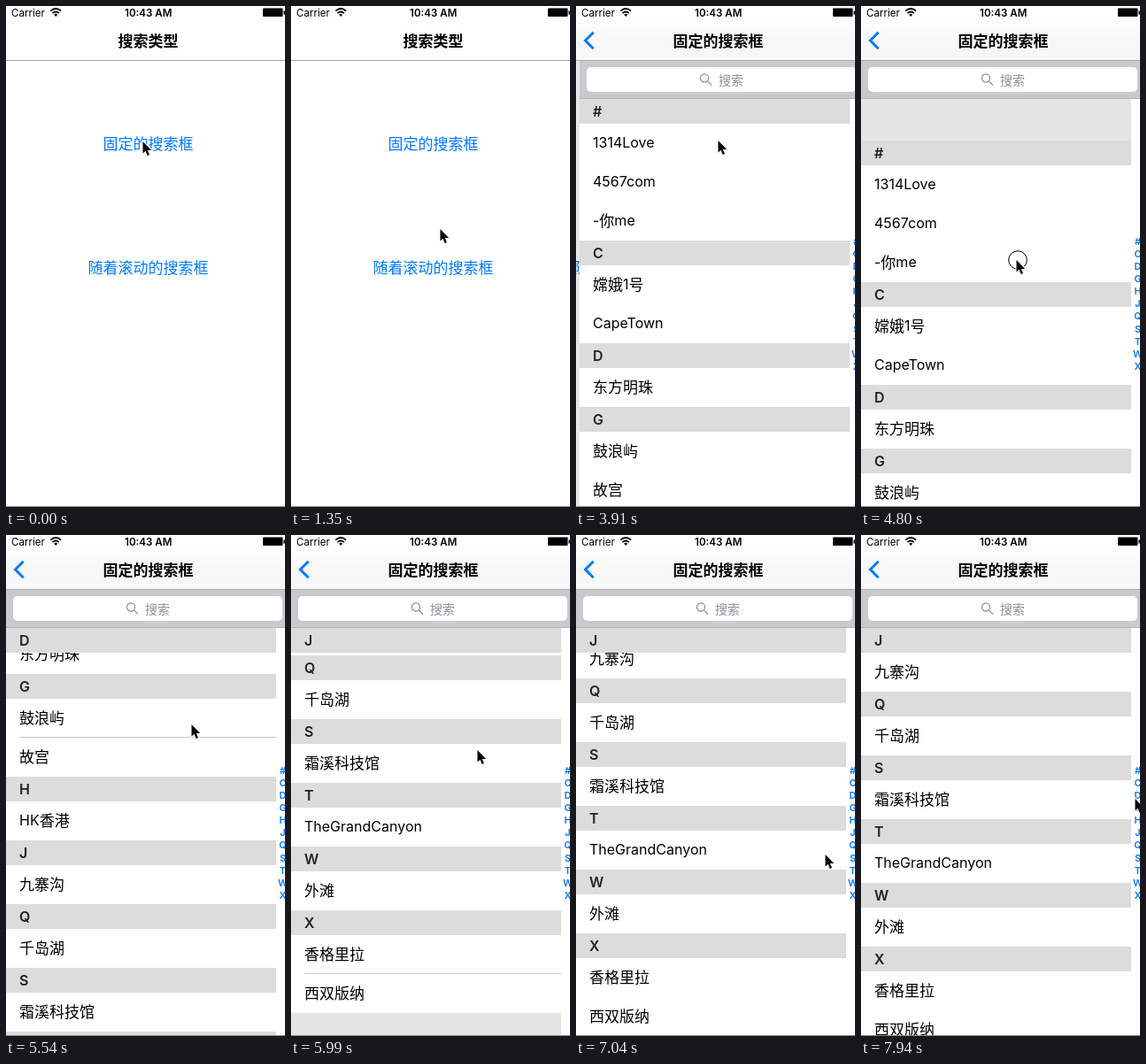
An HTML page that plays this animation: 315x566 px, repeating every 8 s.

```html
<!DOCTYPE html>
<html lang="zh-CN">
<head>
<meta charset="utf-8">
<style>
html, body { margin: 0; width: 100%; height: 100%; overflow: hidden; background: #fff; }
#stage { position: absolute; left: 0; top: 0; width: 315px; height: 566px; overflow: hidden; background: #fff;
  font: 16px/1 Inter, "Noto Sans CJK SC", "Noto Sans CJK", sans-serif; color: #000; white-space: nowrap; }
#stage * { box-sizing: border-box; }
#stage div, #stage svg { position: absolute; }
.cjk { position: relative; top: -1px; font: 17px/1 "Noto Sans CJK SC", "Noto Sans CJK", sans-serif; font-weight: inherit; }
.page { left: 0; top: 62px; width: 320px; height: 504px; overflow: hidden; background: #fff; }
.center { left: 0; width: 321px; height: 24px; display: flex; align-items: center; justify-content: center; }
.link { color: #007aff; }
#shade { inset: 0; background: #000; }
#nav { left: 0; top: 0; width: 315px; height: 62px; background: #fefefe; border-bottom: 1px solid #a9a9ac; }
#tint { inset: 0; background: linear-gradient(#fff 8px, #f7f7f8 40px); }
.title { top: 27px; font-weight: 600; }
.status { top: 1px; font-size: 11.6px; line-height: 14px; }
#bar { left: 0; top: 0; width: 320px; height: 43px; background: #c9c9ce; border-bottom: 1px solid #b3b3b7; }
#field { left: 8px; top: 7px; width: 304px; height: 28px; border-radius: 5px; background: #fff; }
#hint { left: 157px; top: 14px; color: #8e8e93; }
#hint .cjk { font-size: 14px; }
#list { left: 0; top: 43px; width: 305px; height: 461px; overflow: hidden; background: #e5e5e5; }
#content { left: 0; top: 0; width: 305px; background: #fff; }
.row, .head { left: 0; width: 305px; padding-left: 15px; display: flex; align-items: center; }
.row { height: 44px; padding-bottom: 2px; }
.head { height: 28px; background: #dcdcdc; color: #222; font-weight: 600; z-index: 1; }
.rule { left: 15px; right: 0; height: 1px; background: #c8c7cc; }
.letter { width: 20px; left: 302.5px; text-align: center; color: #007aff; font-size: 11px; font-weight: 600; line-height: 14px; }
#foot { left: 0; top: 565px; width: 315px; height: 1px; background: #8a8a8a; }
</style>
</head>
<body>
<div id="stage">
  <div class="page" id="home">
    <div class="center link" id="fixedLink" style="top:81px">固定的搜索框</div>
    <div class="center link" style="top:221px">随着滚动的搜索框</div>
    <div id="shade"></div>
  </div>
  <div class="page" id="places">
    <div id="bar">
      <div id="field"></div>
      <svg style="left:135px;top:13px" width="16" height="16" fill="none" stroke="#8e8e93" stroke-width="1.2">
        <circle cx="6" cy="6.5" r="4.6"/><path d="M9.4 9.9L14 14.5"/>
      </svg>
      <div id="hint">搜索</div>
    </div>
    <div id="list"><div id="content"></div></div>
  </div>
  <div id="nav">
    <div id="tint"></div>
    <div class="center title" id="homeTitle">搜索类型</div>
    <div class="center title" id="listTitle">固定的搜索框</div>
    <svg id="back" style="left:7px;top:27px" width="16" height="24" fill="none" stroke="#007aff" stroke-width="3">
      <path d="M12.7 2.8L3.5 12L12.7 21.2"/>
    </svg>
    <div class="status" style="left:6px">Carrier</div>
    <div class="status" style="left:134px;font-weight:600">10:43 AM</div>
    <svg style="left:49px;top:1px" width="15" height="12" fill="none" stroke="#000" stroke-width="1.8">
      <path d="M1.3 4.6Q7.2 -.6 13.1 4.6M3.5 7.1Q7.2 3.8 10.9 7.1"/>
      <path d="M5.2 8.7Q7.2 7 9.2 8.7L7.2 11Z" fill="#000" stroke="none"/>
    </svg>
    <svg style="left:289px;top:1px" width="26" height="13">
      <rect x="1" y="1.5" width="22.5" height="9.5" rx="1"/><rect x="24.5" y="4.5" width="1.5" height="4"/>
    </svg>
  </div>
  <div id="foot"></div>
  <svg id="cursor" style="left:0;top:0" width="40" height="40">
    <circle id="ring" cx="22" cy="20" r="10.3" fill="none" stroke="#000"/>
    <path d="M20.5 20V33.6L23.5 30.8L25.7 36L28 35L25.8 30H30.2Z" stroke="#fff" stroke-width="2" paint-order="stroke"/>
  </svg>
</div>
<script>
const LOOP = 8000, STEP = 150, WIDTH = 320, HEAD = 28, ROW = 44;
const $ = id => document.getElementById(id);
const wrapCjk = s => s.replace(/[\u4e00-\u9fff]+/g, '<span class="cjk">$&</span>');

const sections = [
  ['#', '1314Love', '4567com', '-你me'], ['C', '嫦娥1号', 'CapeTown'], ['D', '东方明珠'],
  ['G', '鼓浪屿', '故宫'], ['H', 'HK香港'], ['J', '九寨沟'], ['Q', '千岛湖'],
  ['S', '霜溪科技馆'], ['T', 'TheGrandCanyon'], ['W', '外滩'], ['X', '香格里拉', '西双版纳']
];

function add(parent, cls, top, text = '') {
  const el = document.createElement('div');
  el.className = cls;
  el.style.top = top + 'px';
  el.innerHTML = wrapCjk(text);
  parent.append(el);
  return el;
}

for (const el of document.querySelectorAll('.center, #hint')) el.innerHTML = wrapCjk(el.textContent);

let y = 0;
const heads = [], rules = [];
sections.forEach(([letter, ...names], i) => {
  const top = y;
  y += HEAD;
  names.forEach((name, k) => {
    if (k) rules.push(add($('content'), 'rule', y - 1));
    add($('content'), 'row', y, name);
    y += ROW;
  });
  heads.push({ el: add($('content'), 'head', top, letter), letter, top, end: y });
  add($('places'), 'letter', 196.5 + 14.15 * i, letter);
});
$('content').style.height = y + 'px';

const BOTTOM = y - 461;
const JUMP = heads.find(head => head.letter === 'J').top;
const PUSH = 3450, PULL = 4500, FLING = 5550, PICK = 7800;

// Pointer stops: time, x, y
const stops = [[600, 154, 153], [1650, 173, 292], [2550, 160, 152], [4200, 160, 152], [4800, 175, 287],
  [5400, 209, 505], [FLING, 209, 214], [6300, 210, 262], [7350, 309, 400], [7500, 309, 400], [7950, 309, 298]];

function pointerAt(t) {
  const i = stops.findIndex(stop => stop[0] > t);
  if (i <= 0) return stops.at(i).slice(1);
  const [t0, x0, y0] = stops[i - 1], [t1, x1, y1] = stops[i];
  const f = (t - t0) / (t1 - t0);
  return [x0 + (x1 - x0) * f, y0 + (y1 - y0) * f];
}

// Elastic pull at the top, then a fling that overshoots the bottom and settles
function scrollAt(t) {
  if (t >= PICK) return JUMP;
  if (t >= FLING) {
    const age = t - FLING;
    return BOTTOM + (296 - BOTTOM + 1.725 * age) * Math.exp(-age / 150);
  }
  const pull = Math.min(1, Math.max(0, (t - PULL) / 750));
  return -49.4 * Math.sin(Math.PI * pull);
}

// Critically damped push of the list page
function slideAt(t) {
  const w = 0.0141 * Math.max(0, t - PUSH);
  return Math.floor(WIDTH * (1 + w) * Math.exp(-w));
}

const pressedAt = t => t === PUSH || (t > PULL && t <= 4800) || t === FLING - STEP || t === PICK;
const shift = (id, x, y = 0) => { $(id).style.transform = `translate(${x}px, ${y}px)`; };
const fade = (id, opacity) => { $(id).style.opacity = opacity; };

function draw(time) {
  const t = Math.floor((time % LOOP + 10) / STEP) * STEP;
  const [px, py] = pointerAt(t);
  const scroll = Math.round(scrollAt(t));
  const rest = slideAt(t);
  const left = rest / WIDTH, done = 1 - left;
  const oldTitle = Math.max(0, left * 1.05 - 0.05);

  shift('cursor', Math.round(px) - 20, Math.round(py) - 20);
  fade('ring', pressedAt(t) ? 1 : 0);

  shift('places', rest);
  shift('home', -0.3 * WIDTH * done);
  fade('shade', 0.1 * done);
  fade('fixedLink', t === PUSH ? 0.3 : 1);
  shift('homeTitle', -90 * done);
  fade('homeTitle', oldTitle);
  shift('listTitle', 120 * oldTitle);
  for (const id of ['listTitle', 'back', 'tint']) fade(id, done);

  shift('content', 0, -scroll);
  for (const { el, top, end } of heads)
    el.style.top = Math.max(top, Math.min(scroll, end - HEAD)) + 'px';
  const ruled = t >= FLING && t < 6600;
  for (const el of rules) el.style.opacity = ruled ? 1 : 0;
}

const begin = performance.now();
function tick() {
  draw(performance.now() - begin);
  requestAnimationFrame(tick);
}
tick();
</script>
</body>
</html>
```
